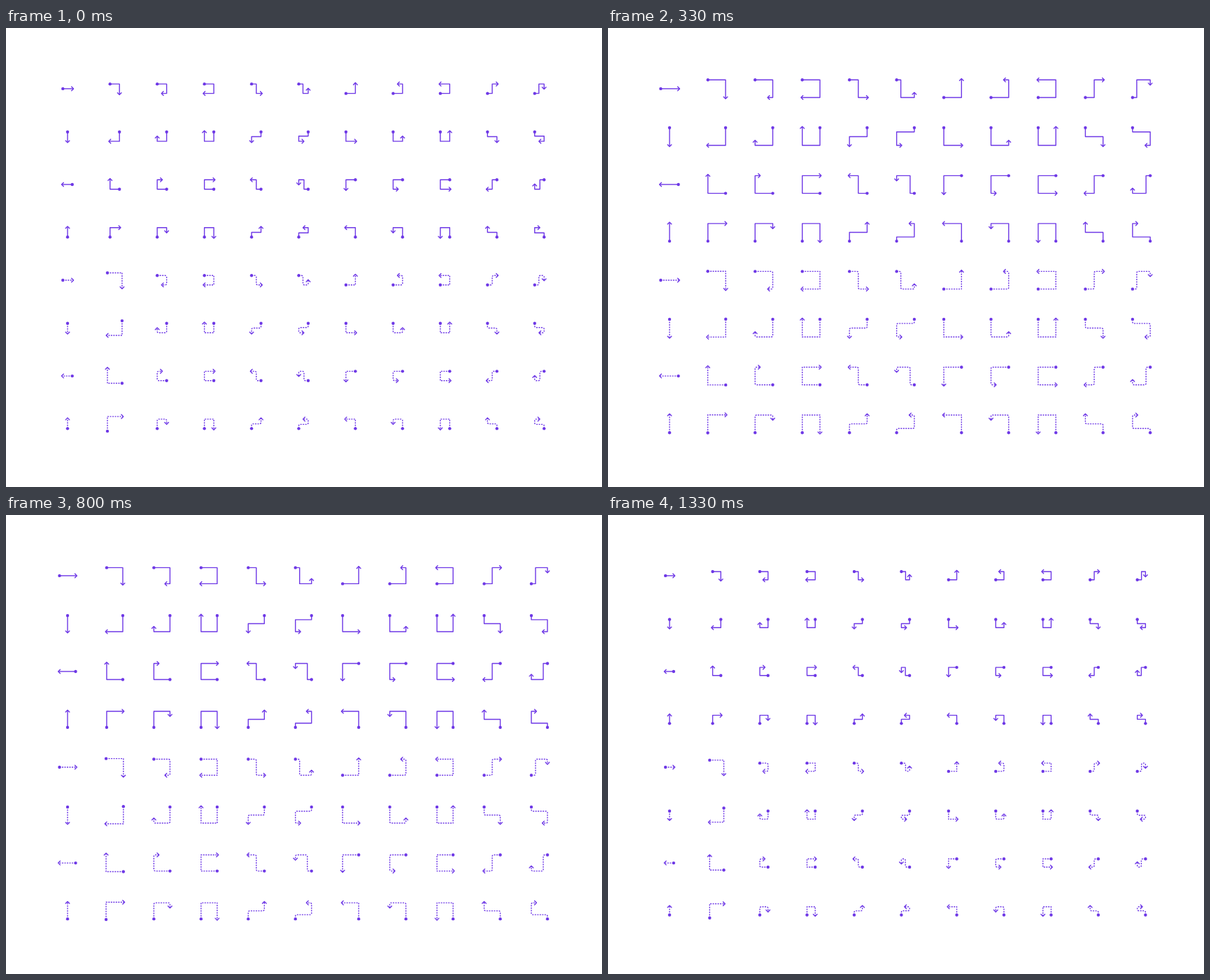
Write an HTML page with a canvas that moves like this. It is 852 by 657 pixels and loops after 1400 ms.

```html
<!DOCTYPE html>
<html lang="en">
<head>
<meta charset="utf-8">
<title>Connector arrows</title>
<style>
html, body { margin: 0; overflow: hidden; background: #fff; }
canvas { display: block; }
</style>
</head>
<body>
<canvas width="852" height="657"></canvas>
<script>
const ctx = document.querySelector('canvas').getContext('2d');
const LOOP = 1400, STEPS = 21, MOVE = 600;
const COLOR = '#6e38e6';
const LEG = 6, SHORT = 5.6, TIP = 1.8, WING = 2.8;

// Elbow paths for half-size h; short end legs keep a fixed length.
const shapes = [
  h => [[-h, 0], [h, 0]],
  h => [[-h, -h], [h, -h], [h, h]],
  h => [[-h, -h], [h, -h], [h, h], [h - SHORT, h]],
  h => [[-h, -h], [h, -h], [h, h], [-h, h]],
  h => [[-h, -h], [0, -h], [0, h], [h, h]],
  h => [[-h, -h], [LEG - h, -h], [LEG - h, h], [h, h], [h, h - SHORT]],
  h => [[-h, h], [h, h], [h, -h]],
  h => [[-h, h], [h, h], [h, -h], [h - SHORT, -h]],
  h => [[-h, h], [h, h], [h, -h], [-h, -h]],
  h => [[-h, h], [0, h], [0, -h], [h, -h]],
  h => [[-h, h], [LEG - h, h], [LEG - h, -h], [h, -h], [h, SHORT - h]]
];
const rounded = new Set([2, 4, 5, 7, 9, 10]);

// cubic-bezier(.42, 0, .58, 1)
function easeInOut(x) {
  let s = x;
  for (let i = 0; i < 6; i++) {
    s -= (s * (1.26 + s * (0.52 * s - 0.78)) - x) / (1.26 - 1.56 * s + 1.56 * s * s);
  }
  return s * s * (3 - 2 * s);
}

function drawArrow(points, dashed, radius) {
  const [x, y] = points[0];
  const [px, py] = points[points.length - 2];
  let [ex, ey] = points[points.length - 1];
  const dx = Math.sign(ex - px), dy = Math.sign(ey - py);
  ex += dx * TIP;
  ey += dy * TIP;

  ctx.setLineDash(dashed ? [2, 1.5] : []);
  ctx.beginPath();
  ctx.moveTo(x, y);
  for (let i = 1; i < points.length - 1; i++) {
    ctx.arcTo(...points[i], ...points[i + 1], radius);
  }
  ctx.lineTo(ex, ey);
  ctx.lineCap = 'butt';
  ctx.stroke();

  ctx.setLineDash([]);
  ctx.lineCap = 'round';
  ctx.beginPath();
  ctx.moveTo(ex - WING * (dx + dy), ey - WING * (dy - dx));
  ctx.lineTo(ex, ey);
  ctx.lineTo(ex - WING * (dx - dy), ey - WING * (dy + dx));
  ctx.stroke();

  ctx.beginPath();
  ctx.arc(x, y, 2.2, 0, 2 * Math.PI);
  ctx.fill();
}

function render(time) {
  const step = Math.floor((time % LOOP + 4) * STEPS / LOOP) % STEPS;
  const u = (step * LOOP / STEPS + 180) % LOOP;
  const grow = easeInOut(Math.min(1, u / MOVE, (LOOP - u) / MOVE));

  ctx.fillStyle = '#fff';
  ctx.fillRect(0, 0, 852, 657);
  ctx.fillStyle = ctx.strokeStyle = COLOR;
  ctx.lineWidth = 1.4;
  ctx.lineJoin = 'round';
  for (let row = 0; row < 8; row++) {
    const dashed = row > 3;
    shapes.forEach((shape, col) => {
      const min = dashed && col === 1 ? 9.9 : 5.3;
      ctx.save();
      ctx.translate(88 + col * 67.45, 86.9 + row * 68.53);
      ctx.rotate(row * Math.PI / 2);
      drawArrow(shape(min + (12.95 - min) * grow), dashed, dashed && rounded.has(col) ? 2 : 0);
      ctx.restore();
    });
  }
}

const start = performance.now();
function tick() {
  render(performance.now() - start);
  requestAnimationFrame(tick);
}
tick();
</script>
</body>
</html>
```
